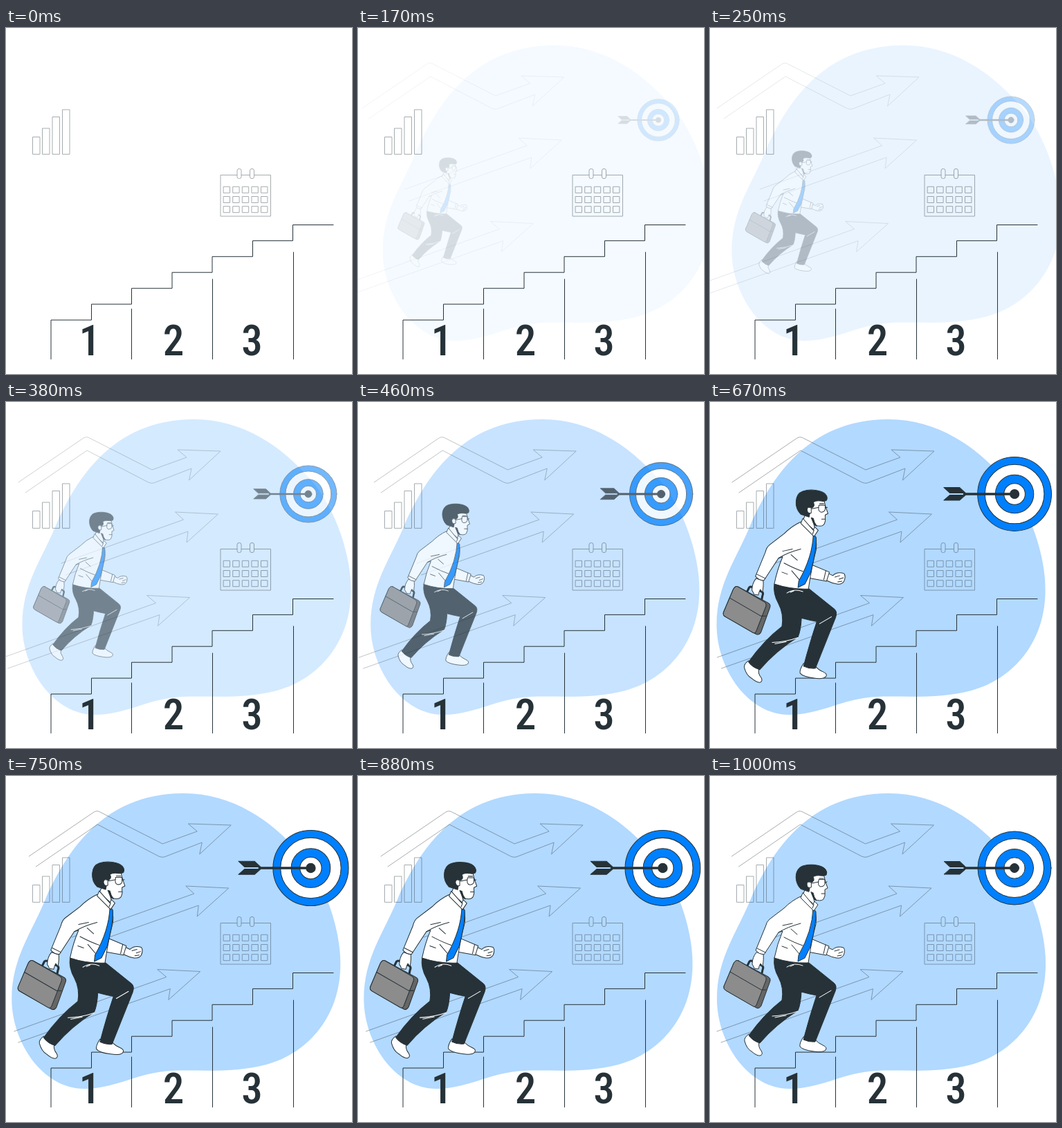
Recreate the animation shown at these times as an HTML page. Size 500x500 px, loop 1040 ms.

```html
<!DOCTYPE html>
<html lang="en">
<head>
<meta charset="utf-8">
<title>Running up the steps</title>
<style>
html, body { margin: 0; width: 100%; height: 100%; overflow: hidden; background: #fff }
svg { display: block; width: 100vw; height: 100vh }
path, rect, circle { fill: none; stroke: #263238; stroke-linejoin: round; stroke-linecap: round }
.faint { opacity: .4 }
.white { fill: #fff }
.blue { fill: #0080ff }
.dark { fill: #263238 }
.light { stroke: #fff }
.shape { fill: #b2d9ff; stroke: none }
.side { fill: #666 }
.leather { fill: #8c8c8c }
text {
  font: 500 61px Oswald, 'Roboto Condensed', 'Open Sans Condensed', 'Liberation Sans Narrow', Roboto, sans-serif;
  font-stretch: condensed; fill: #263238; text-anchor: middle;
}
</style>
</head>
<body>
<svg viewBox="0 0 500 500">
  <g id="blob">
    <path class="shape" d="M258 25C330 25 385 65 425 110C465 155 485 225 485 270C486 345 440 400 378 417C330 430 280 424 240 426C190 429 160 452 115 452C55 452 10 385 10 322C10 262 40 225 60 175C88 113 140 25 258 25Z"/>
  </g>

  <g id="arrows">
    <g class="faint">
      <path d="M31.500 116L124 53Q129 49 134 52L224.500 98L274.500 80L261.500 69L323.500 71L278 113L281.500 96L227 117Q223 118 219 116L130.500 70L41.500 131"/>
      <path d="M93.500 233L270 170L258 159L320 162L274.500 203L276.500 187L99.500 250"/>
      <path d="M10 369L230 290.500L217 279.500L279 282.500L233 323.500L235.500 307.500L16 385"/>
    </g>
  </g>

  <g class="faint">
    <path d="M38.500 182V157.500H49V182ZM52.500 182V145H63V182ZM67 182V128.500H77.500V182ZM81.500 182V118H92V182Z"/>
    <path d="M334 212.500H310V272H382.500V212.500H358.500M352.500 212.500H340"/>
    <rect x="334" y="203.500" width="6" height="14" rx="2.500"/>
    <rect x="352.500" y="203.500" width="6" height="14" rx="2.500"/>
    <g id="days"></g>
  </g>

  <path d="M65 478.500V422H123.500V399.100H181.500V376.200H240V353.200H298V330.300H356.500V307.400H414.500V284.500H473M181.500 406V478.500M298.500 363V478.500M415.500 324V478.500"/>
  <text x="121" y="472.500">1</text>
  <text x="242" y="472.500">2</text>
  <text x="355.500" y="472.500">3</text>

  <g id="target">
    <circle class="blue" cx="440" cy="133" r="53"/>
    <circle class="white" cx="440" cy="133" r="42.500"/>
    <circle class="blue" cx="440" cy="133" r="27.500"/>
    <circle class="white" cx="440" cy="133" r="15.200"/>
    <circle class="dark" cx="440" cy="133" r="6.500"/>
    <path d="M368 133H440" stroke-width="3.500"/>
    <path class="dark" d="M338.500 123.500H361L369.500 131.500H347ZM347 134.500H369.500L361 142H338.500Z"/>
  </g>

  <g id="man">
    <!-- briefcase -->
    <path d="M54 274L57 268Q59 266 62 268L75 274Q78 276 76 280L75 285" stroke-width="3"/>
    <path class="side" d="M41 267L84 290Q88 292 87 296L74 332Q71 337 67 335L23 310Q19 308 20 304L34 271Q37 265 41 267Z"/>
    <path class="leather" d="M41 267L79 289Q82 291 81 295L67 331Q65 335 61 332L23 310Q19 308 20 304L34 271Q37 265 41 267Z"/>
    <path d="M29 283L74 309L81 309"/>
    <!-- shoes and trousers -->
    <path class="white" d="M56 373Q49 378 50 383Q53 394 60 398Q68 405 73 404Q77 402 74 397Q69 391 71 384Z"/>
    <path class="white" d="M135 377Q129 386 130 391Q134 396 150 398Q163 400 167 396Q170 392 163 389Q156 386 151 380Z"/>
    <path class="dark" d="M93 263L143 270Q158 282 179 299Q184 303 181 311L152 384Q143 385 135 381Q144 347 154 317Q143 315 132 312Q131 330 127 339Q95 359 72 386Q62 383 56 375Q78 344 104 324Q107 306 99 291Q91 277 93 263Z"/>
    <path class="light" d="M90 347Q110 346 127 340M94 349L110 346M158 320L175 310M111 276Q122 269 134 274M116 275L121 273"/>
    <!-- arms and shirt -->
    <path class="white" d="M67 255Q61 262 61 272Q63 275 64 278L70 279Q71 274 73 271L76 275Q78 264 77 258Z"/>
    <path class="white" d="M169 247L177 251Q183 245 193 248Q196 252 193 259Q190 264 183 263Q176 262 168 258Z"/>
    <path d="M180 253L187 251M186 256L192 254M184 260L190 259"/>
    <path class="white" d="M141 233L172 246L168 259L141 254Z"/>
    <path d="M167 244L164 257"/>
    <path class="white" d="M131 174Q118 180 107 191L86 207Q82 210 80 218L66 252Q71 258 78 258L99 226L105 224Q97 243 93 263Q117 271 142 270Q147 236 153 214Q155 198 148 187Z"/>
    <path d="M68 249L80 255M99 226Q112 218 131 213M105 216L119 213M117 221L126 229M107 233Q122 241 134 245M118 244L129 257M104 246L112 249"/>
    <path class="blue" d="M149 191L153 196Q154 213 145 247L137 263L127 268L128 259Q148 224 149 191Z"/>
    <!-- head -->
    <path class="white" d="M139 160L134 172L152 187L150 178Q160 182 164 178Q167 173 166 168L166 164L170 162L166 150L164 141L146 142Z"/>
    <path class="dark" d="M131 163C121 153 122 134 134 130C146 126 163 129 167 135Q170 139 168 143Q165 145 160 144Q152 143 149 146Q152 151 147 154Q142 150 141 155Q140 160 144 162L143 167Z"/>
    <path class="dark" d="M146 168L150 178L154 180Q150 175 149 169Z"/>
    <path class="white" d="M146 154Q140 151 140 157Q141 163 146 161Z"/>
    <path class="white" d="M134 169L131 176L150 195L156 186L151 181L149 186Z"/>
    <path d="M150 186L148 191M147 155L157 153M157 150Q155 159 160 160Q165 160 166 156L166 150ZM166 154L169 153M158 148L164 148M161 170L166 170"/>
  </g>
</svg>
<script>
const LOOP = 1040, STEP = 1000 / 24;
const el = id => document.getElementById(id);

let days = '';
for (let i = 0; i < 15; i++)
  days += `<rect x="${314.500 + i % 5 * 13.600}" y="${229.300 + (i / 5 | 0) * 14.200}" width="9" height="9"/>`;
el('days').innerHTML = days;

const bezier = (s, a, b) => 3 * (1 - s) ** 2 * s * a + 3 * (1 - s) * s * s * b + s ** 3;

// Overshooting ease: cubic-bezier(.36, -.01, .5, 1.38)
function ease(x) {
  if (x >= 1) return 1;
  let lo = 0, hi = 1;
  for (let i = 0; i < 24; i++) {
    const mid = (lo + hi) / 2;
    if (bezier(mid, .36, .5) < x) lo = mid; else hi = mid;
  }
  return Math.max(0, bezier(lo, -.01, 1.38));
}

function show(id, p, transform) {
  el(id).setAttribute('transform', transform);
  el(id).setAttribute('opacity', Math.min(1, p));
}

const slide = (p, from) => `translate(${from * (1 - p)} 0)`;
const zoom = (p, x, y) => `translate(${x} ${y}) scale(${.5 + p / 2}) translate(${-x} ${-y})`;

function draw(now) {
  const t = now % LOOP;
  // The picture advances 24 times a second after a short blank hold
  const step = Math.floor((t - 75) / STEP);
  const p = t < 80 ? 0 : ease(.115 + step * STEP / 1000);
  show('blob', p, slide(p, 30));
  show('arrows', p, slide(p, -30));
  show('target', p, zoom(p, 426, 133));
  show('man', p, zoom(p, 108, 266.500));
  requestAnimationFrame(draw);
}
requestAnimationFrame(draw);
</script>
</body>
</html>
```
